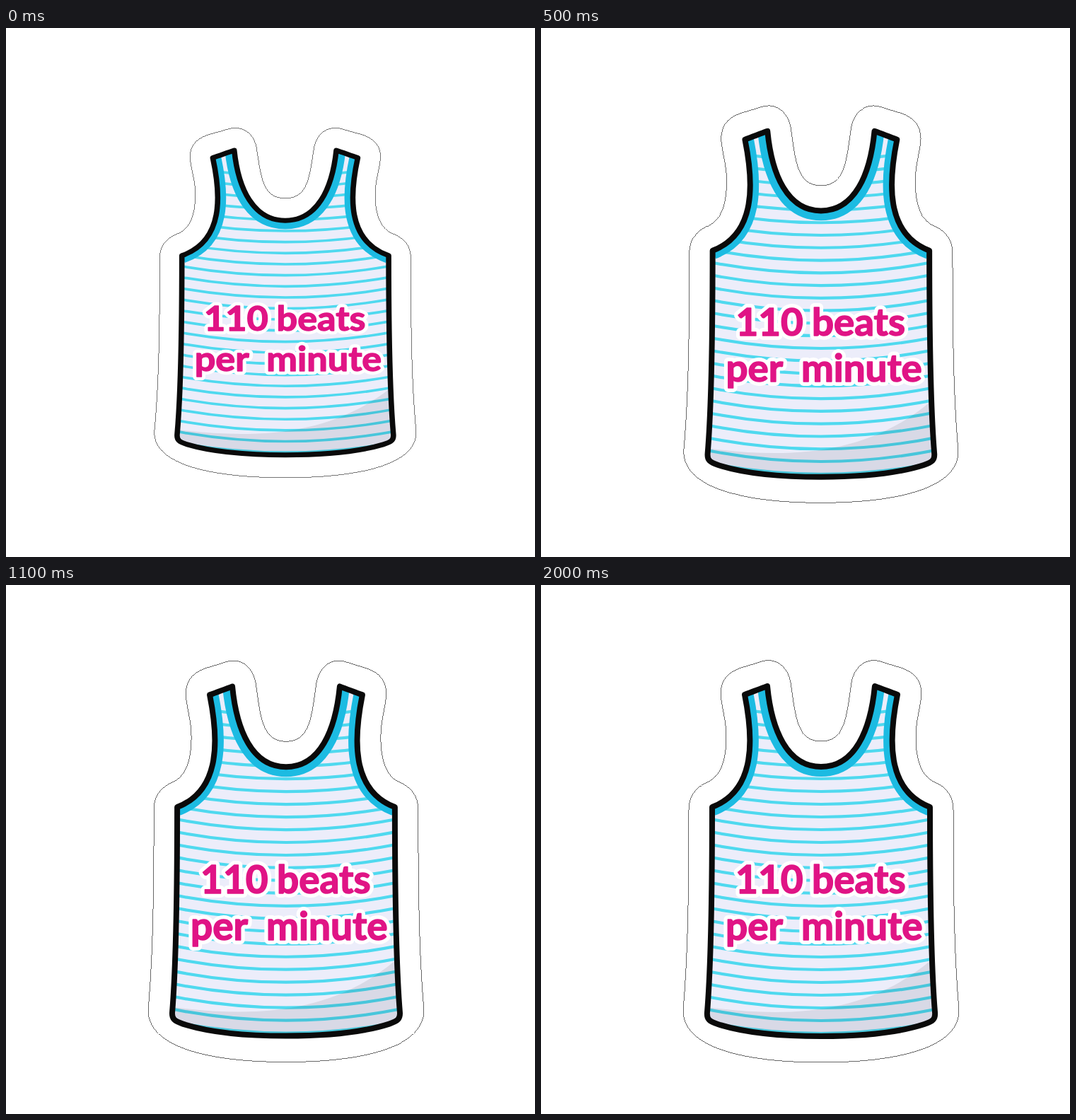
An HTML page that plays this animation: 748x748 px, repeating every 2.1 s.

```html
<!DOCTYPE html>
<html lang="en">
<head>
<meta charset="utf-8">
<title>Bouncing vest</title>
<style>
  html, body { margin: 0; width: 100%; height: 100%; overflow: hidden; background: #fff; }
  svg { display: block; width: 100%; height: 100%; }
  text { font: 700 55px Lato, "Open Sans", sans-serif; }
</style>
</head>
<body>
<svg viewBox="0 0 748 748">
  <defs>
    <clipPath id="inside"><path class="body"/></clipPath>
    <g id="words">
      <text y="436"><tspan x="275">110</tspan> <tspan x="383">beats</tspan></text>
      <text y="502"><tspan x="261">per</tspan> <tspan x="368">minute</tspan></text>
    </g>
  </defs>
  <g id="vest">
    <path id="sticker" fill="#fff" stroke="#000" stroke-width=".6" shape-rendering="crispEdges"/>
    <g clip-path="url(#inside)">
      <path class="body" fill="#ecedfa"/>
      <path id="stripes" fill="none" stroke="#4fd9ef" stroke-width="4.2"/>
      <path id="neck" fill="none" stroke="#1cbbe2" stroke-width="28"/>
      <path id="arms" fill="none" stroke="#1cbbe2" stroke-width="25"/>
      <path d="M235 597C350 612 460 608 552 530L570 650H225Z" fill="#000014" opacity=".085"/>
    </g>
    <path class="body" fill="none" stroke="#0a0a0a" stroke-width="8" stroke-linejoin="round"/>
    <g stroke-linejoin="round">
      <use href="#words" fill="#fff" stroke="#fff" stroke-width="12"/>
      <use href="#words" fill="#e01485" stroke="#e01485" stroke-width="1.6"/>
    </g>
  </g>
</svg>
<script>
  const AXIS = 396, CENTER = 374, LOOP = 2100, STEP = 100, SETTLED = 1400;

  // Left halves, from the top of the axis to the bottom: a start point, then cubic segments.
  const bodyHalf = [
    [396, 257],
    [348, 257], [326, 205], [320, 143],
    [309, 147], [299, 151], [288, 155],
    [300, 215], [305, 290], [242, 314],
    [242, 430], [241, 530], [235, 604],
    [234, 614], [238, 617], [250, 621],
    [290, 634], [345, 638], [396, 638]
  ];
  const stickerHalf = [
    [396, 221],
    [362, 221], [360, 185], [354, 145],
    [352, 118], [334, 100], [309, 109],
    [300, 112], [293, 114], [283, 117],
    [262, 124], [251, 138], [255, 163],
    [258, 183], [262, 195], [262, 215],
    [262, 248], [254, 268], [239, 277],
    [222, 284], [209, 295], [209, 318],
    [209, 430], [208, 520], [201, 600],
    [199, 655], [290, 675], [396, 675]
  ];

  const mirror = points => points.map(([x, y]) => [2 * AXIS - x, y]);
  const curve = ([start, ...rest]) => `M${start}C${rest.join(' ')}`;
  const closed = half => curve([...half, ...mirror(half).reverse().slice(1)]) + 'Z';
  const setPath = (selector, d) =>
    document.querySelectorAll(selector).forEach(el => el.setAttribute('d', d));

  const neckHalf = bodyHalf.slice(0, 4);
  const arm = bodyHalf.slice(6, 10);
  setPath('.body', closed(bodyHalf));
  setPath('#sticker', closed(stickerHalf));
  setPath('#neck', curve([...neckHalf.slice().reverse(), ...mirror(neckHalf).slice(1)]));
  setPath('#arms', curve(arm) + curve(mirror(arm)));

  let stripes = '';
  for (let y = 184; y <= 634; y += 18) stripes += `M230 ${y - 17}Q396 ${y + 17} 562 ${y - 17}`;
  setPath('#stripes', stripes);

  // Damped spring around the stage centre, stepped ten times a second.
  const vest = document.getElementById('vest');
  function draw(time) {
    const t = Math.floor(time % LOOP / STEP) * STEP;
    const stretch = t < SETTLED ? -0.13 * Math.exp(-t / 300) * Math.cos(Math.PI * t / 300) : 0;
    vest.setAttribute('transform',
      `translate(${CENTER} ${CENTER}) scale(${1 + 0.39 * stretch} ${1 + stretch}) translate(${-CENTER} ${-CENTER})`);
  }

  const begin = performance.now();
  function tick() {
    draw(performance.now() - begin);
    requestAnimationFrame(tick);
  }
  tick();
</script>
</body>
</html>
```
